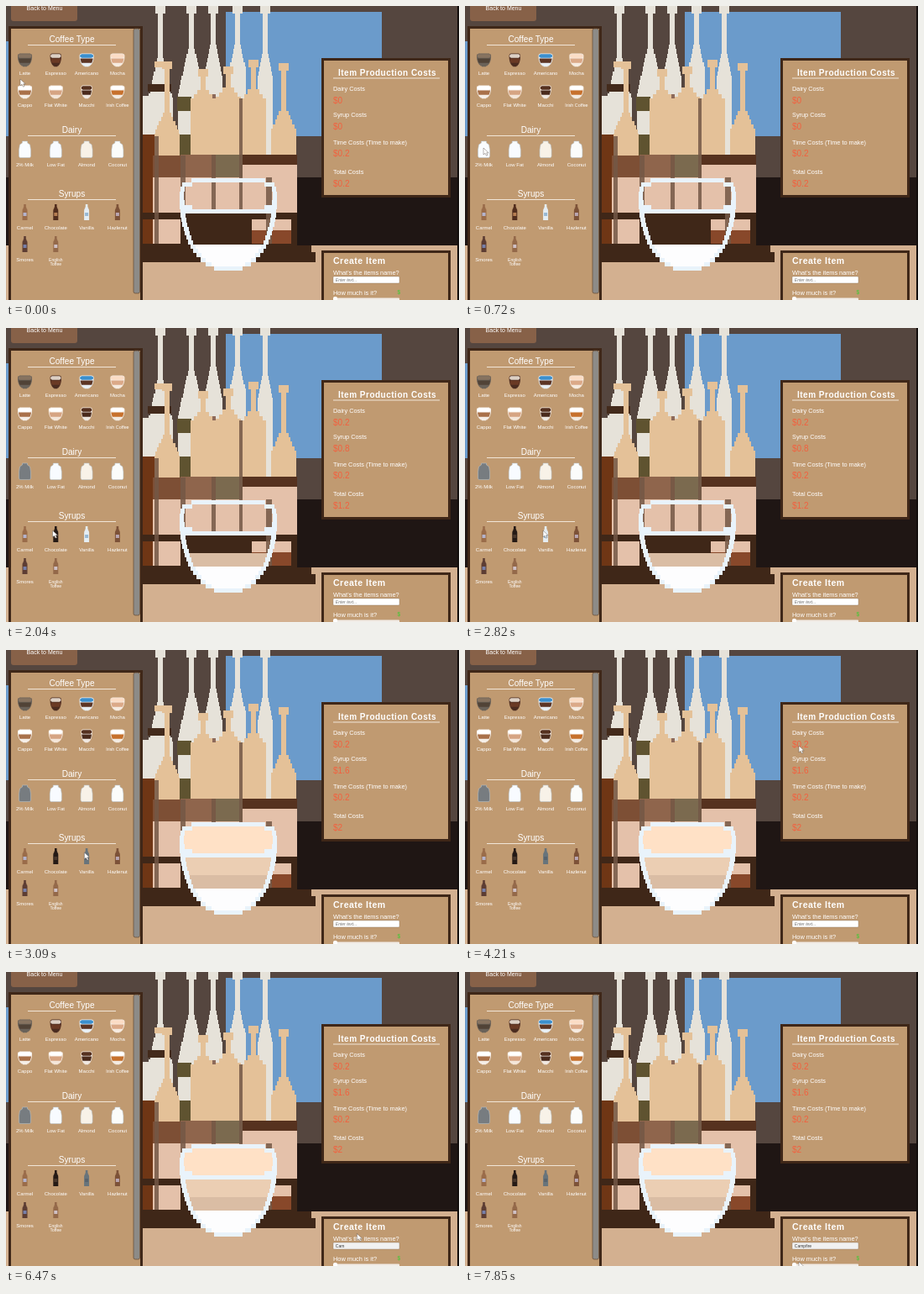
These frames come from a looping animation (540x350 px, 8000 ms). An HTML page:

```html
<!DOCTYPE html>
<html lang="en">
<head>
<meta charset="utf-8">
<title>Coffee item builder</title>
<style>
html, body { margin: 0; width: 100%; height: 100%; overflow: hidden; background: #55463f; }
svg { display: block; width: 540px; height: 350px; }
text { font-family: "Liberation Sans", Arial, sans-serif; fill: #fff; }
</style>
</head>
<body>
<svg id="stage" viewBox="0 0 540 350"></svg>
<script>
const LOOP = 8000;
const CREAM = '#e6e2d9', TAN = '#e4c198', PINK = '#e4c1aa', DARK = '#3f2718', RUST = '#6f3615';
const stage = document.getElementById('stage');

function add(tag, attrs, parent = stage) {
  const el = document.createElementNS('http://www.w3.org/2000/svg', tag);
  for (const key in attrs) el.setAttribute(key, attrs[key]);
  parent.appendChild(el);
  return el;
}
const rect = (x, y, width, height, fill, more) => add('rect', { x, y, width, height, fill, ...more });
function text(x, y, size, str, more) {
  const el = add('text', { x, y, 'font-size': size, ...more });
  el.textContent = str;
  return el;
}
const centred = (x, y, size, str) => text(x, y, size, str, { 'text-anchor': 'middle' });
const clamp = v => Math.max(0, Math.min(1, v));

// Mirrored pixel outline: half(y) gives the half width, sampled once per row.
function pixels(cx, top, bottom, half, row = 5.25) {
  let right = '', left = '';
  const count = Math.max(1, Math.round((bottom - top) / row));
  const edge = i => top + (bottom - top) * i / count;
  for (let i = 0; i < count; i++) {
    const w = half((edge(i) + edge(i + 1)) / 2);
    right += `${i ? 'L' : 'M'}${cx + w} ${edge(i)}V${edge(i + 1)}`;
    left = `L${cx - w} ${edge(i + 1)}V${edge(i)}` + left;
  }
  return right + left + 'Z';
}
const shape = (d, fill, parent) => add('path', {
  d, fill, 'fill-rule': 'evenodd', 'shape-rendering': 'crispEdges'
}, parent);

// ---- room ----
rect(0, 0, 540, 350, '#55463f');
rect(0, 42, 3, 113, '#6b9bcb');
rect(262, 7, 186, 148, '#6b9bcb');
rect(0, 204, 540, 81, '#1f1614');
rect(0, 285, 540, 65, '#d3b090');
rect(163, 285, 206, 20, DARK);
rect(364, 285, 5, 8, '#d3b090');
rect(538, 0, 2, 350, '#120d0c');

// ---- bottles ----
function bottle(cx, top, shoulder, half, rise, fill) {
  shape(pixels(cx, top, top + 9, () => 6), fill);
  shape(pixels(cx, top + 9, 178, y => Math.round(3 + (half - 3) * clamp((y - shoulder) / rise))), fill);
}
for (const [cx, shoulder, half] of [[184, 60, 15], [221, 48, 16], [247, 45, 11], [276, 42, 10], [309, 54, 9]])
  bottle(cx, 0, shoulder, half, half * 3.5, CREAM);
rect(163, 107, 15, 46, CREAM);
rect(169, 93, 28, 9, '#432a1b');
rect(204, 108, 17, 17, '#5f5330');
rect(205, 153, 15, 25, '#5f5330');
rect(236, 105, 14, 11, '#8d6a5a');
rect(163, 153, 15, 93, RUST);
rect(177, 66, 17, 7, TAN);
for (const [cx, top, shoulder] of [[192, 66, 125], [235, 75, 97], [265, 72, 95], [295, 64, 97], [331, 68, 122]])
  bottle(cx, top, shoulder, 15, shoulder > 120 ? 26 : 15, TAN);

rect(175, 178, 33, 26, '#7d4f35');
rect(208, 177, 42, 27, '#8f654c');
rect(250, 177, 32, 27, '#7b6a4f');
rect(175, 204, 172, 42, PINK);
rect(282, 189, 65, 20, PINK);
rect(282, 177, 65, 12, '#56321f');
rect(163, 246, 184, 39, DARK);
rect(163, 254, 12, 29, RUST);
rect(175, 254, 33, 29, PINK);
rect(293, 254, 47, 13, PINK);
rect(293, 267, 47, 16, '#88482a');
const seam = (x, y, w, bottom) => rect(x, y, w, bottom - y, '#745746', { opacity: .85 });
seam(177, 155, 5, 283);
seam(208, 178, 6, 246);
seam(245, 177, 5, 246);
seam(278, 110, 4, 246);
seam(310, 204, 7, 283);

// ---- cup, drawn around x = 0 with its top at y = 0 ----
const bulge = (rx, ry, power) => y => Math.round(rx * (1 - Math.abs((y - 21) / ry) ** power) ** (1 / power));
const lip = bulge(58, 21, 3.5), bowl = bulge(58, 89, 2.2), inside = y => bowl(y) - 6;
const cup = {
  outer: pixels(0, 0, 110, y => y < 21 ? lip(y) : bowl(y)),
  rim: pixels(0, 5, 37, bulge(53, 16, 3.5)),
  body: pixels(0, 42, 79, inside),
  high: pixels(0, 42, 63, inside),
  low: pixels(0, 63, 79, inside),
  base: pixels(0, 79, 105, inside)
};
const bigCup = add('g', { transform: 'translate(264.5 205)' });
const lowFill = shape(cup.low, '#dabda4', bigCup);
const highFill = add('g', {}, bigCup);
shape(cup.rim, '#ffe1c6', highFill);
shape(cup.high, '#ebceb3', highFill);
shape(cup.outer + cup.rim + cup.body, '#e9f3fb', bigCup);
shape(cup.base, '#fdfdfe', bigCup);

// ---- panels ----
const panel = (x, y, w, h) => rect(x + 1.5, y + 1.5, w - 3, h - 3, '#c09a71', { stroke: DARK, 'stroke-width': 3 });
const rule = (x, y, w) => rect(x, y, w, .9, '#f6eee4');

rect(6, -6, 79, 24, '#876148', { rx: 3 });
centred(46, 5, 7, 'Back to Menu');
panel(3, 24, 160, 340);
rect(152, 27, 7.5, 315, '#8d8b88', { rx: 2, stroke: '#6d5139', 'stroke-width': .8 });
for (const [name, y] of [['Coffee Type', 43], ['Dairy', 151], ['Syrups', 227]]) {
  centred(78.5, y, 10.1, name);
  rule(26, y + 3, 105);
}
const column = i => 22.5 + 36.8 * (i % 4);
const line = (i, y) => y + 38 * Math.floor(i / 4);

// ---- coffee icons: small cups ----
const coffees = [
  ['Latte', '#6a6259', '#877360', '#514337'],
  ['Espresso', '#4b2c20', '#ddd0c5', '#6a3a25'],
  ['Americano', '#e8eff4', '#3b8fcd', '#5c3524'],
  ['Mocha', '#f6ebe0', '#fbdcc5', '#dba988'],
  ['Cappo', '#f5eee7', '#fff', '#a9714a'],
  ['Flat White', '#f4e6d9', '#fff', '#d6a483'],
  ['Macchi', '#efe7e0', '#55301f', '#4a2a1c'],
  ['Irish Coffee', '#f3ebe2', '#fff', '#c7712d']
];
coffees.forEach(([name, edge, top, body], i) => {
  const x = column(i), y = line(i, 56.5), slim = /Espresso|Macchi/.test(name);
  const icon = add('g', { transform: `translate(${x} ${y}) scale(${slim ? .115 : .147} .143)` });
  const parts = [[cup.outer, edge], [cup.rim, top], [cup.body, body]];
  for (const [d, fill] of parts) add('path', { d, fill }, icon);
  centred(x, y + 25.8, name.length > 10 ? 5.4 : 6, name);
});

// ---- dairy icons ----
const dairy = [['2% Milk', '#fafcff'], ['Low Fat', '#f8fbff'], ['Almond', '#f8f2e8'], ['Coconut', '#fbfcfa']];
const jugs = dairy.map(([name, fill], i) => {
  const x = column(i);
  centred(x, 190.5, 6, name);
  return add('path', {
    d: `M${x - 3} 161h6v2l3 2 1 6v8l-1 1.5h-12l-1-1.5v-8l1-6 3-2z`,
    fill, stroke: '#b6c7d2', 'stroke-width': .5
  });
});

// ---- syrup icons ----
const syrups = [
  ['Carmel', '#9a6c4a', '#b4b3cc'], ['Chocolate', '#522e1e', '#b67e52'],
  ['Vanilla', '#e5edf2', '#98b8d3'], ['Hazlenut', '#7d5238', '#b9a5b0'],
  ['Smores', '#5d3d33', '#777fa8'], ['English', '#94694a', '#cfc0c4']
];
const flasks = syrups.map(([name, fill, label], i) => {
  const x = column(i), y = line(i, 236);
  const glass = add('path', { d: pixels(x, y, y + 19, h => 1.3 + 1.7 * clamp((h - y - 3) / 4), 1.5), fill });
  const tag = rect(x - 2, y + 10, 4, 4, label);
  const [size, drop] = name === 'English' ? [5, 29.7] : [6, 30.3];
  centred(x, y + drop, size, name);
  return { glass, tag, fill, label };
});
centred(column(5), 308.7, 5, 'Toffee');

// ---- cost panel ----
const bold = { 'font-weight': 'bold', 'letter-spacing': .5 };
panel(376, 62, 154, 166);
text(396, 83, 10, 'Item Production Costs', bold);
rule(390, 85.5, 127);
const [dairyCost, syrupCost, timeCost, totalCost] =
  [['Dairy Costs', 101], ['Syrup Costs', 132], ['Time Costs (Time to make)', 164.5], ['Total Costs', 200]]
    .map(([name, y]) => {
      text(390, y, 7.35, name);
      return text(390, y + 14.6, 10, '', { style: 'fill:#f2603f' });
    });
timeCost.textContent = '$0.2';

// ---- create panel ----
panel(376, 291, 154, 80);
text(390, 306.5, 10.5, 'Create Item', bold);
text(390, 319.5, 7.35, "What's the items name?");
const field = rect(390, 322, 79, 8, '#fff', { rx: 1, stroke: '#8b7760', 'stroke-width': .4 });
const hint = text(392.8, 328, 5, 'Enter text...', { style: 'fill:#777;font-style:italic' });
const typed = text(392.8, 328, 5, '', { style: 'fill:#333' });
text(390, 343.5, 7.4, 'How much is it?');
text(466.5, 342.7, 6.5, '$', { style: 'fill:#58c040;font-weight:bold' });
rect(390, 347.5, 79, 3, '#f1ece6', { rx: 1 });
rect(390, 346, 5, 5, '#fff', { rx: 2 });

const pointer = add('path', {
  d: 'M0 0V8L2 6.3 3.5 9.2 5 8.5 3.6 5.8H6.2Z', fill: '#fff', stroke: '#4b4038', 'stroke-width': .4
});

// ---- motion ----
// Pointer way points (time, x, y); between them it advances in even jumps.
const route = [
  [0, 17, 87], [150, 16, 136], [420, 16, 161], [720, 22, 169], [860, 22, 169], [1220, 31, 204],
  [1490, 47, 236], [1760, 55, 241], [2070, 56, 241], [2550, 88, 242], [2820, 93, 241],
  [3250, 94, 241], [4090, 398, 114], [4240, 401, 115], [5080, 414, 306], [5320, 420, 321],
  [5810, 418, 311], [7460, 419, 312], [7850, 398, 345]
];
function pointerAt(t) {
  const next = route.findIndex(([at]) => at > t);
  if (next < 0) return route.at(-1).slice(1);
  const [t0, x0, y0] = route[next - 1], [t1, x1, y1] = route[next];
  const jumps = Math.round((t1 - t0) / 125);
  const part = Math.floor((t - t0) / (t1 - t0) * jumps + 1e-6) / jumps;
  return [x0 + (x1 - x0) * part, y0 + (y1 - y0) * part];
}

// One letter per jump, the last ones in pairs.
function lettersAt(t) {
  const n = Math.floor((t - 6230) / 120) + 1;
  return t < 6200 ? 0 : Math.min(8, Math.max(1, n + Math.max(0, n - 4)));
}

const show = (el, on) => el.setAttribute('visibility', on ? 'visible' : 'hidden');
const paint = (el, fill) => el.setAttribute('fill', fill);
function dim({ glass, tag, fill, label }, on, dark, darkTag) {
  paint(glass, on ? dark : fill);
  paint(tag, on ? darkTag : label);
}
const money = v => '$' + +v.toFixed(1);

function draw(t) {
  const milk = t >= 980, chocolate = t >= 2040, vanilla = t >= 2970;
  paint(jugs[0], milk ? '#777c80' : dairy[0][1]);
  dim(flasks[1], chocolate, '#251a15', '#49372c');
  dim(flasks[2], vanilla, '#68747b', '#59646d');
  show(lowFill, chocolate);
  show(highFill, vanilla);

  const dairyPrice = milk ? .2 : 0, syrupPrice = .8 * (chocolate + vanilla);
  dairyCost.textContent = money(dairyPrice);
  syrupCost.textContent = money(syrupPrice);
  totalCost.textContent = money(dairyPrice + syrupPrice + .2);

  const count = lettersAt(t);
  typed.textContent = 'Campfire'.slice(0, count);
  show(hint, !count);
  paint(field, t >= 5200 ? '#f1f1f1' : '#fff');
  pointer.setAttribute('transform', `translate(${pointerAt(t)})`);
}

const start = performance.now();
function tick() {
  draw((performance.now() - start) % LOOP);
  requestAnimationFrame(tick);
}
tick();
</script>
</body>
</html>
```
